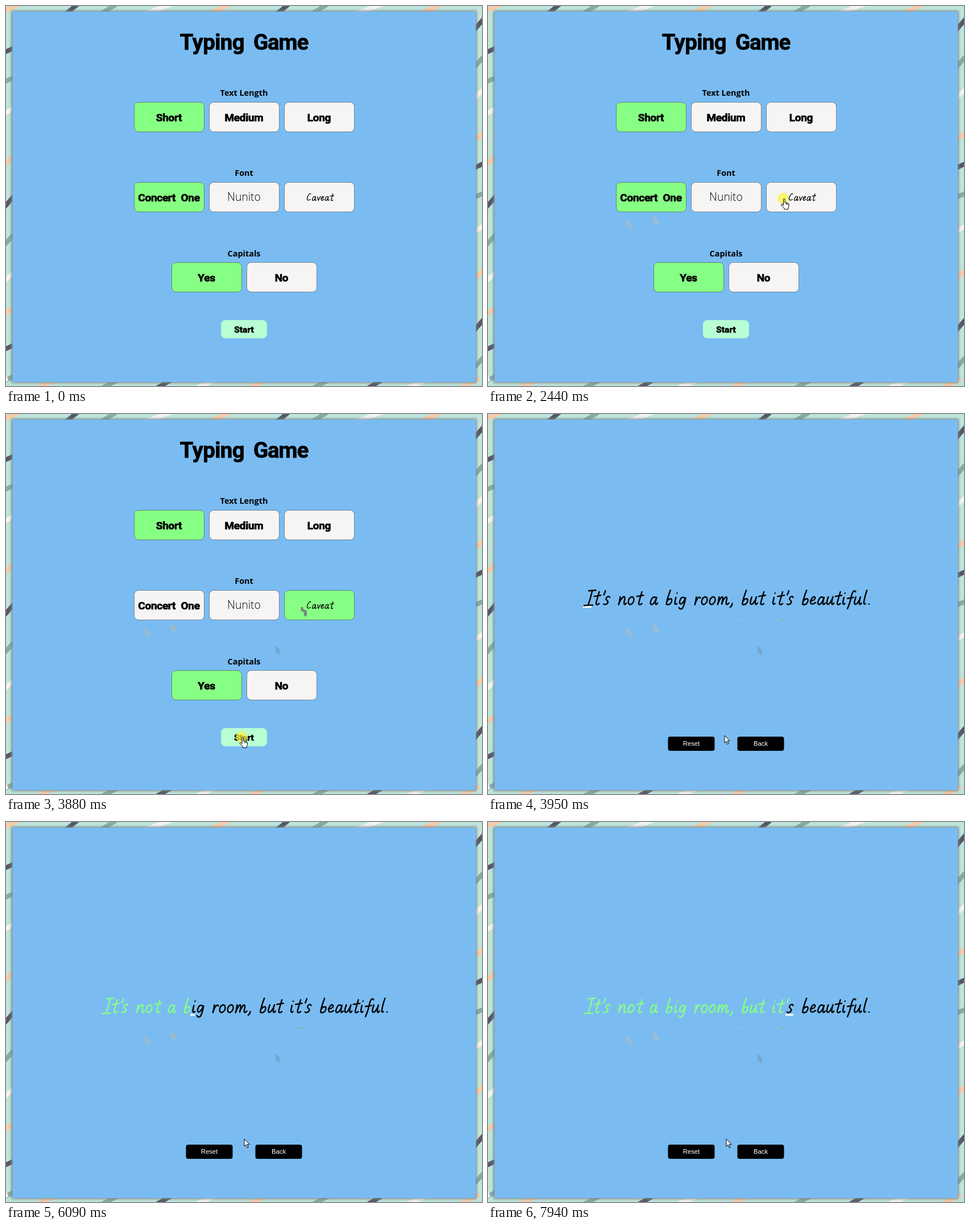
An HTML page for the animation above (8 s loop, 837x669 px).

```html
<!DOCTYPE html>
<html lang="en">
<head>
<meta charset="utf-8">
<title>Typing Game</title>
<style>
html, body { margin: 0; width: 100%; height: 100%; overflow: hidden; background: #bee6dd; }
svg { display: block; width: 100%; height: 100%; }
text { text-anchor: middle; }
.round { font-family: Roboto, sans-serif; font-weight: 700; stroke: #000; stroke-width: .7; stroke-linejoin: round; }
.label { font: 700 14.4px "Open Sans", "Noto Sans", sans-serif; }
.light { font: 300 19.3px "Open Sans", Lato, sans-serif; }
.small { font: 11.3px "Liberation Sans", Arial, sans-serif; fill: #fff; }
.hand { fill: none; stroke: #000; stroke-linecap: round; stroke-linejoin: round; }
</style>
</head>
<body>
<svg id="stage" viewBox="0 0 837 669" xmlns="http://www.w3.org/2000/svg">
  <filter id="soft" x="-5%" y="-5%" width="110%" height="110%"><feGaussianBlur stdDeviation="2.2"/></filter>
  <g id="stripes" fill="none" stroke-width="8"></g>
  <rect x="9.5" y="8.5" width="818" height="655" fill="#7c8482" filter="url(#soft)"/>
  <rect x="11.5" y="10" width="814.5" height="652" fill="#7abcf2"/>
  <g id="menu"></g>
  <g id="game"></g>
  <g id="trails"></g>
  <circle id="glow" r="10" fill="#fdf53c" opacity=".72"/>
  <g id="pointer" fill="#fff" stroke="#000" stroke-linejoin="round"></g>
</svg>
<script>
const LOOP = 8000, GREEN = '#87ff85', PAPER = '#f6f5f4';
const PICK = 2570, PRESS = 3880, OPEN = 3950;
const $ = id => document.getElementById(id);

function add(parent, tag, attrs, text) {
  const el = document.createElementNS('http://www.w3.org/2000/svg', tag);
  for (const k in attrs) el.setAttribute(k, attrs[k]);
  if (text) el.textContent = text;
  parent.appendChild(el);
  return el;
}
const show = (el, on) => el.setAttribute('visibility', on ? 'visible' : 'hidden');
const label = (parent, cls, x, y, text, size, gap = 0) =>
  add(parent, 'text', { class: cls, x, y, style: size ? `font-size:${size}px;letter-spacing:${gap}px;word-spacing:5px` : '' }, text);

// Striped backdrop seen around the panel
const [DARK, GREY, WHITE, PEACH] = ['#55586c', '#86aaa6', '#f4f4f2', '#f7cba8'];
const stripe = (stroke, x, y, run, rise) =>
  add($('stripes'), 'path', { stroke, d: `M${x - run} ${y + rise}L${x + run} ${y - rise}` });
const CYCLE = [DARK, GREY, WHITE, PEACH];
[78, 130, 185, 272, 345, 412, 477, 537, 601, 656].forEach((y, i) =>
  stripe(CYCLE[i % 4], 5, y, 11, 9 + 4 * Math.sin((y - 230) / 83)));
[32, 98, 154, 229, 281, 333, 392, 472, 561, 627].forEach((y, i) =>
  stripe(CYCLE[i % 4], 832, y, 11, 9 + 4 * Math.sin((y - 446) / 83)));
for (let k = -1; k < 3; k++) {
  const x = 371 * k;
  stripe(DARK, x + 116, 5, 15, 12);
  stripe(GREY, x + 181, 5, 18, 11);
  stripe(WHITE, x + 268, 5, 28, 10);
  stripe(PEACH, x + 376, 5, 22, 10);
  stripe(DARK, x + 277, 666, 18, 10);
  stripe(WHITE, x + 350, 666, 24, 10);
  stripe(PEACH, x + 441, 666, 20, 10);
  stripe(GREY, x + 182, 666, 20, 10);
}

// Pen strokes for the handwriting: advance, then path from the baseline
const PEN = {
  I: [15, 'M10 -27L24 -28M17 -27Q14 -13 9 1M1 2Q9 1 18 1'],
  C: [18, 'M17 -24Q15 -28 10 -21Q3 -12 4 -5Q6 2 16 -4'],
  t: [13.5, 'M14 -25Q10 -11 8 -4Q7 1 11 0L14 -2M4 -16L17 -18'],
  "'": [5, 'M11 -27Q10 -23 8 -19'],
  s: [14, 'M14 -14Q12 -18 8 -14Q5 -10 9 -8Q12 -5 9 -2Q6 1 2 -1'],
  n: [17, 'M6 -15Q5 -6 3 0Q6 -10 12 -15Q16 -17 15 -11Q13 -3 14 -1Q16 1 18 -3'],
  o: [14, 'M10 -15Q4 -14 3 -6Q3 0 7 0Q13 -2 14 -9Q14 -16 9 -15'],
  a: [15.5, 'M13 -14Q7 -17 4 -8Q1 0 6 0Q11 -2 15 -14Q12 -4 13 -1Q15 1 17 -3'],
  b: [15, 'M12 -28Q6 -13 4 -1Q7 2 12 -2Q16 -7 14 -11Q10 -13 5 -6'],
  i: [8, 'M6 -14Q4 -6 4 -2Q5 1 8 -2M8 -22L8.5 -22.5'],
  g: [16.5, 'M14 -13Q8 -17 5 -8Q3 -1 7 -1Q12 -3 16 -13Q14 0 10 7Q6 11 3 6'],
  r: [12, 'M6 -15Q5 -6 3 0Q6 -9 9 -13Q12 -16 14 -13'],
  m: [23, 'M6 -15Q5 -6 3 0Q6 -9 10 -14Q14 -17 13 -10L11 -1Q14 -10 18 -14Q22 -17 21 -10Q19 -3 20 -1Q22 1 25 -3'],
  ',': [8, 'M6 -2Q6 2 2 5'],
  u: [14, 'M6 -15Q3 -6 3 -3Q4 2 9 -3Q13 -8 15 -15Q12 -5 13 -1Q15 1 17 -3'],
  e: [13, 'M4 -7Q12 -9 12 -13Q11 -17 7 -14Q2 -8 3 -4Q5 2 13 -4'],
  f: [13, 'M20 -25Q16 -31 12 -18Q10 -6 4 8M4 -12L16 -14'],
  l: [8, 'M12 -28Q6 -10 6 -3Q7 1 9 -2'],
  v: [13, 'M5 -14Q6 -6 7 0Q11 -7 15 -15'],
  '.': [8, 'M7 -1L7.5 -1'],
  ' ': [11.5, '']
};
const INK = .9;
function write(parent, text, x, y, scale, weight) {
  const g = add(parent, 'g', {
    class: 'hand', role: 'img', 'aria-label': text,
    transform: `translate(${x} ${y}) scale(${scale})`, 'stroke-width': weight / scale / INK
  });
  let pos = 0;
  return [...text].map(ch => {
    const [w, d] = PEN[ch];
    const el = add(g, 'path', { d, transform: `translate(${pos + 1} 0) scale(${INK})` });
    const letter = { x: x + pos * scale, w, el };
    pos += w;
    return letter;
  });
}

// Menu screen
const menu = $('menu'), boxes = [];
function option(x, y, name, on) {
  const box = add(menu, 'rect', {
    x: x + .5, y: y + .5, width: 123, height: 52, rx: 8,
    fill: on ? GREEN : PAPER, stroke: '#333', 'stroke-dasharray': '1 1'
  });
  if (name) label(menu, 'round', x + 61.5, y + 34, name, 19, -.3);
  boxes.push([x, y, 123, 53]);
  return box;
}
label(menu, 'round', 362.5, 77, 'Typing', 38.5, -.6);
label(menu, 'round', 483, 77, 'Game', 38.5, -1.2);
label(menu, 'label', 418.5, 158, 'Text Length');
label(menu, 'label', 418.5, 299, 'Font');
label(menu, 'label', 418.5, 441, 'Capitals');
option(225, 169, 'Short', true);
option(357, 169, 'Medium');
option(489, 169, 'Long');
const first = option(225, 310, 'Concert One', true);
option(357, 310);
label(menu, 'light', 418.5, 342.5, 'Nunito');
const third = option(489, 310);
write(menu, 'Caveat', 527, 342.5, .54, 1.3);
option(291, 451, 'Yes', true);
option(423, 451, 'No');
add(menu, 'rect', { x: 378, y: 553, width: 81, height: 32, rx: 8, fill: '#b8ffd3' });
boxes.push([378, 553, 81, 32]);
label(menu, 'round', 418.5, 575, 'Start', 15.5);

// Game screen
const game = $('game');
const mark = add(game, 'rect', { y: 338, height: 3, fill: '#fff' });
const letters = write(game, "It's not a big room, but it's beautiful.", 167, 335.5, 1, 2.4);
[[316.5, 'Reset'], [438.5, 'Back']].forEach(([x, name]) => {
  add(game, 'rect', { x, y: 568, width: 82, height: 25, rx: 4 });
  label(game, 'small', x + 41, 584, name);
});
add(game, 'path', { d: 'M442 363H448', stroke: '#a9c6dc' });
add(game, 'path', { d: 'M515 363H523', stroke: '#6fbf8f', 'stroke-width': 2 });

// Pointer and the traces it leaves
const ARROW = 'M0 0V13L3 10.2L5 15.5L7.2 14.5L5 9.5H9Z';
const trails = [
  [1340, 244.5, 376.5, '#9fb9ca'], [1410, 291.5, 369.5, '#a3bbc9'], [3250, 474.5, 408.5, '#74a6d0']
].map(([from, x, y, fill]) => ({
  from, to: LOOP,
  el: add($('trails'), 'path', { d: ARROW, fill, stroke: fill, transform: `translate(${x} ${y})` })
}));
trails.push({
  from: 3040, to: OPEN,
  el: add($('trails'), 'path', { d: 'M518 340L519 347L524 349V354L526 357L529 354V346L523 344L522 340Z', fill: '#7b8580' })
});
const pointer = $('pointer');
const arrow = add(pointer, 'path', { d: ARROW });
const hand = add(pointer, 'path', {
  transform: 'translate(-5 0)',
  d: 'M4.5 12V1.8Q4.5 .5 5.8 .5Q7 .5 7 1.8V7L12 8Q14 8.5 14 10.5V13Q14 15 12.5 17V19H6V17L1 12Q0 10.5 1.2 9.8Q2.5 9.5 4.5 12ZM9.5 8V11M12 8.5V11'
});
const MOVES = [
  [990, 39, 396], [1270, 244, 377], [1340, 291, 369], [1480, 410, 348], [1760, 494, 342],
  [1830, 498, 342], [2110, 520, 339], [2900, 520, 339], [2970, 518, 344], [3180, 474, 408],
  [3740, 414, 570], [3810, 415, 571], [3950, 416, 566], [4150, 419, 558]
];
function place(t) {
  const i = MOVES.findLastIndex(m => m[0] <= t);
  const a = MOVES[i], b = MOVES[i + 1];
  if (!b) return [a[1], a[2]];
  const k = Math.floor((t - a[0]) / 68) * 68 / (b[0] - a[0]);
  return [1, 2].map(n => a[n] + (b[n] - a[n]) * Math.min(k, 1));
}

const KEYS = [
  4750, 5080, 5150, 5280, 5350, 5480,
  5690, 5760, 5830, 5890, 5960, 6090, 6220, 6290, 6350, 6420,
  6550, 6680, 6810, 7020, 7150, 7220, 7350, 7420, 7550, 7680, 7810, 7940
];

function draw(t) {
  const playing = t >= OPEN, picked = t >= PICK;
  menu.style.display = playing ? 'none' : '';
  game.style.display = playing ? '' : 'none';
  first.setAttribute('fill', picked ? PAPER : GREEN);
  third.setAttribute('fill', picked ? GREEN : PAPER);

  const typed = KEYS.filter(k => k <= t).length;
  letters.forEach((l, i) => l.el.setAttribute('stroke', i < typed ? GREEN : '#000'));
  mark.setAttribute('x', letters[typed].x);
  mark.setAttribute('width', letters[typed].w);

  trails.forEach(s => show(s.el, t >= s.from && t < s.to));
  const moving = t >= MOVES[0][0];
  const [x, y] = moving ? place(t) : [0, 0];
  const over = !playing && boxes.some(([bx, by, w, h]) => x >= bx && x <= bx + w && y >= by && y <= by + h);
  show(arrow, moving && !over);
  show(hand, moving && over);
  pointer.setAttribute('transform', `translate(${x} ${y})`);

  const glow = $('glow');
  show(glow, (t >= 2440 && t < PICK) || (t >= PRESS && t < OPEN));
  glow.setAttribute('cx', x - 1);
  glow.setAttribute('cy', y);
}

const start = performance.now();
function tick() {
  draw((performance.now() - start) % LOOP);
  requestAnimationFrame(tick);
}
tick();
</script>
</body>
</html>
```
